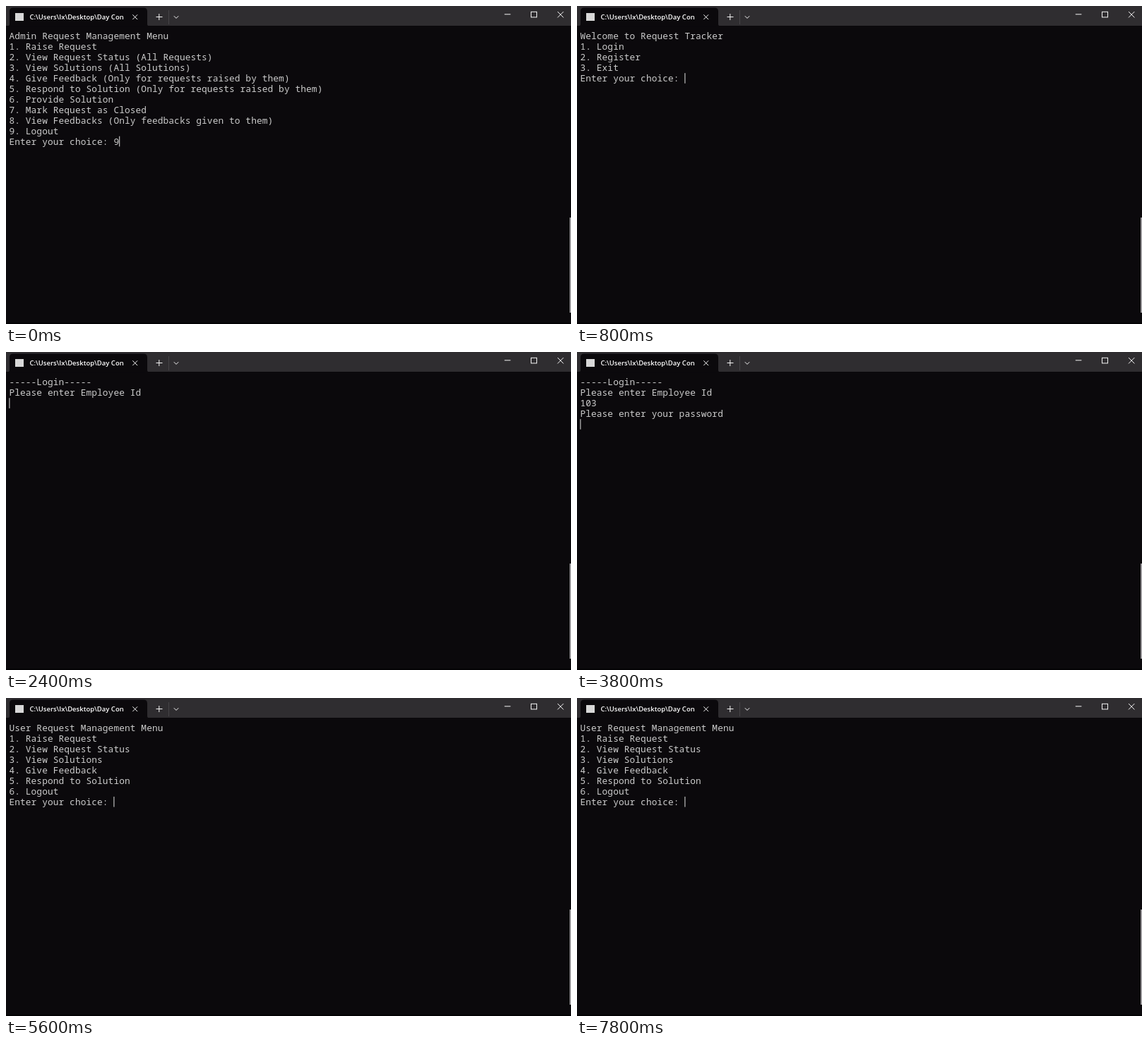
Animation of 800x451 px, one loop 8 s. Source, as an HTML page with a canvas:

```html
<!DOCTYPE html>
<html lang="en">
<head>
<meta charset="utf-8">
<title>Request tracker console</title>
<style>
  html, body { margin: 0; width: 100%; height: 100%; overflow: hidden; background: #0b090c; }
  canvas { display: block; width: 800px; height: 451px; }
</style>
</head>
<body>
<canvas id="stage"></canvas>
<script>
const WIDTH = 800, HEIGHT = 451, LOOP = 8000;
const CELL = { left: 4.4, top: 35.4, width: 7.79, height: 14.93, baseline: 11.8 };
const COLOR = { bar: '#2f2d30', back: '#0b090c', text: '#cccccc', white: '#f4f4f4' };

const canvas = document.getElementById('stage');
const ratio = window.devicePixelRatio || 1;
canvas.width = Math.round(WIDTH * ratio);
canvas.height = Math.round(HEIGHT * ratio);
const ctx = canvas.getContext('2d');

const PROMPT = 'Enter your choice: ';
const ADMIN = `Admin Request Management Menu
1. Raise Request
2. View Request Status (All Requests)
3. View Solutions (All Solutions)
4. Give Feedback (Only for requests raised by them)
5. Respond to Solution (Only for requests raised by them)
6. Provide Solution
7. Mark Request as Closed
8. View Feedbacks (Only feedbacks given to them)
9. Logout
${PROMPT}9`;
const WELCOME = `Welcome to Request Tracker
1. Login
2. Register
3. Exit
${PROMPT}`;
const LOGIN = '-----Login-----\nPlease enter Employee Id\n';
const PASSWORD = `${LOGIN}103\nPlease enter your password\n`;
const USER = `User Request Management Menu
1. Raise Request
2. View Request Status
3. View Solutions
4. Give Feedback
5. Respond to Solution
6. Logout
${PROMPT}`;
const SECRET = 'lime123';

// Each screen: start time, printed text, characters typed so far.
const SCREENS = [
  [0, ADMIN, ''],
  [200, ADMIN + '\nPress any key to continue...\n', ''],
  [800, WELCOME, ''],
  [1000, WELCOME, '1'],
  [1200, WELCOME, '12'],
  [1800, WELCOME, '1'],
  [2400, LOGIN, ''],
  [2800, LOGIN, '1'],
  [3000, LOGIN, '10'],
  [3200, LOGIN, '103'],
  [3800, PASSWORD, ''],
  [4600, PASSWORD, SECRET.slice(0, 1)],
  [4800, PASSWORD, SECRET.slice(0, 3)],
  [5000, PASSWORD, SECRET.slice(0, 4)],
  [5200, PASSWORD, SECRET],
  [5600, USER, '']
];
const CURSOR_OFF = [[4400, 4600], [6200, 6800], [7400, 7800]];

function box(x, y, w, h, color) {
  ctx.fillStyle = color;
  ctx.fillRect(x, y, w, h);
}

function line(points, color = COLOR.white, width = 1) {
  ctx.strokeStyle = color;
  ctx.lineWidth = width;
  ctx.beginPath();
  points.forEach(([x, y]) => ctx.lineTo(x, y));
  ctx.stroke();
}

function cross(x, y, r) {
  line([[x - r, y - r], [x + r, y + r]]);
  line([[x - r, y + r], [x + r, y - r]]);
}

function drawTab() {
  ctx.fillStyle = COLOR.back;
  ctx.beginPath();
  ctx.moveTo(2, 28.5);
  ctx.quadraticCurveTo(5, 28.5, 5, 25.5);
  ctx.lineTo(5, 7.5);
  ctx.quadraticCurveTo(5, 2.5, 10, 2.5);
  ctx.lineTo(195, 2.5);
  ctx.quadraticCurveTo(200, 2.5, 200, 7.5);
  ctx.lineTo(200, 25.5);
  ctx.quadraticCurveTo(200, 28.5, 203, 28.5);
  ctx.fill();

  box(13, 10, 12, 11, '#d8d8d8');
  ctx.fillStyle = '#ffffff';
  ctx.font = '600 9.5px "Open Sans", "Noto Sans", sans-serif';
  ctx.fillText('C:\\Users\\Ix\\Desktop\\Day Con', 33.4, 19.4);
  cross(182.7, 15.7, 3.4);
}

function drawWindow() {
  box(0, 0, WIDTH, HEIGHT, COLOR.back);
  box(0, 0, WIDTH, 28, COLOR.bar);
  drawTab();

  line([[212.5, 15.5], [221.5, 15.5]]);
  line([[216.8, 11], [216.8, 20]]);
  line([[230.5, 6], [230.5, 26]], '#464447');
  line([[237.8, 14.2], [241, 17.4], [244.2, 14.2]]);

  line([[705.8, 11.8], [714.4, 11.8]]);
  ctx.strokeStyle = COLOR.white;
  ctx.strokeRect(743.5, 8.3, 8, 7.6);
  cross(785.2, 12.2, 4.2);

  box(798, 300, 2, 135, '#9b999c');
  box(0, 449, WIDTH, 2, '#040305');
}

function drawConsole(text, cursorOn) {
  const rows = text.split('\n');
  ctx.font = '500 12.8px "Noto Sans Mono", "DejaVu Sans Mono", monospace';
  ctx.fillStyle = COLOR.text;
  rows.forEach((row, r) => {
    const y = CELL.top + r * CELL.height + CELL.baseline;
    [...row].forEach((char, c) => ctx.fillText(char, CELL.left + c * CELL.width, y));
  });
  if (cursorOn) {
    const last = rows.length - 1;
    box(CELL.left + rows[last].length * CELL.width, CELL.top + last * CELL.height,
      1, CELL.height - 0.3, '#e0e0e0');
  }
}

function draw(now) {
  const time = now % LOOP;
  const [, printed, typed] = SCREENS.filter(([start]) => start <= time).pop();
  const hidden = CURSOR_OFF.some(([from, to]) => time >= from && time < to);
  ctx.setTransform(ratio, 0, 0, ratio, 0, 0);
  drawWindow();
  drawConsole(printed + typed, !hidden);
}

const startTime = performance.now();
function tick() {
  draw(performance.now() - startTime);
  requestAnimationFrame(tick);
}
tick();
</script>
</body>
</html>
```
